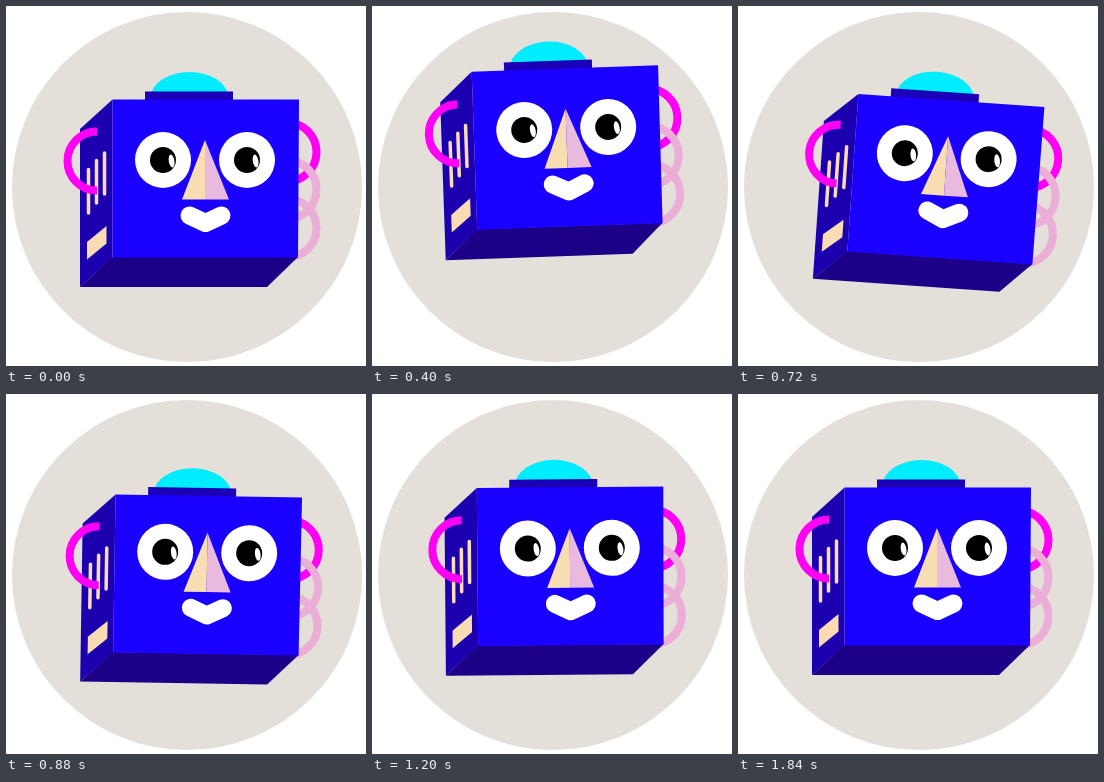
Write an HTML page that moves like this. It is 360 px wide and 360 px high and loops after 1.92 s.

```html
<!DOCTYPE html>
<html lang="en">
<head>
<meta charset="utf-8">
<title>Bouncing robot</title>
<style>
  html, body { margin: 0; width: 100%; height: 100%; overflow: hidden; background: #fff; }
  svg { display: block; width: 100vw; height: 100vh; }
</style>
</head>
<body>
<svg viewBox="0 0 360 360">
  <defs>
    <g id="eye">
      <circle r="28" fill="#fff"/>
      <circle r="13"/>
      <ellipse cx="8.6" cy="1" rx="2.8" ry="6.5" fill="#fff" transform="rotate(-9 8.6 1)"/>
    </g>
  </defs>
  <circle cx="181" cy="181" r="175" fill="#e4dfd9"/>
  <g id="robot">
    <g fill="none" stroke="#ebaed6" stroke-width="8">
      <circle cx="281" cy="146" r="29.5" stroke="#ff00f5"/>
      <circle cx="281" cy="183.500" r="29.5"/>
      <circle cx="281" cy="222" r="29.5"/>
    </g>
    <ellipse cx="183.500" cy="92" rx="39" ry="26" fill="#00ecff"/>
    <path d="M139 85.500H227V95H139z" fill="#1c00b8"/>
    <path d="M74 123L106.500 93.500V251.500L74 281z" fill="#1c00b0"/>
    <path d="M106.500 251L292 251L261 281H74z" fill="#1c0088"/>
    <path d="M106.500 93.500H293L292 251.500H106.500z" fill="#1a00ff"/>
    <g stroke="#fadcb4" stroke-width="3.5" stroke-linecap="round">
      <path d="M82.500 163.500V207M90.500 154.500V197M98.500 147V188"/>
    </g>
    <path d="M81 236L100.500 220V237.500L81 253.500z" fill="#fadcb4"/>
    <path d="M91 125.500a29.500 29.500 0 0 0 0 59" fill="none" stroke="#ff00f5" stroke-width="8"/>
    <g id="face">
      <g id="eyes">
        <use href="#eye" x="157"/>
        <use href="#eye" x="241"/>
      </g>
      <path d="M199 134V193.500H176z" fill="#f8dcb2"/>
      <path d="M199 134L223 193.500H199z" fill="#e9b9de"/>
      <path d="M183.500 209.500L199.500 217L215.500 209.500" fill="none" stroke="#fff"
            stroke-width="18" stroke-linecap="round" stroke-linejoin="round"/>
    </g>
  </g>
</svg>
<script>
const LOOP = 1920, STEP = 80;

// Keys are [time in ms, value].
const lift = [[0, 0], [400, -30], [880, 8], [1200, 0], [1360, -1.8], [1520, -0.8], [1840, 0], [LOOP, 0]];
const tilt = [[0, 0], [160, 3.2], [240, 0.9], [400, -2], [560, -0.4], [720, 4], [880, 0.9],
  [1040, -0.5], [1200, -0.5], [1520, 0], [LOOP, 0]];
const lag = [[0, 0], [240, 1.8], [400, -0.5], [560, -3], [720, -4.5], [880, -4], [1200, 0.5], [1520, 0], [LOOP, 0]];

// Slope at a key: flat at turning points, averaged elsewhere.
function slope(keys, i) {
  if (i === 0 || i === keys.length - 1) return 0;
  const [[ta, a], [t, v], [tb, b]] = keys.slice(i - 1, i + 2);
  return (v - a) * (b - v) <= 0 ? 0 : (b - a) / (tb - ta);
}

function sample(keys, t) {
  const i = keys.findIndex(k => k[0] > t) - 1;
  const [ta, a] = keys[i], [tb, b] = keys[i + 1];
  const d = tb - ta, p = (t - ta) / d, q = 1 - p;
  return a * q * q * (1 + 2 * p) + b * p * p * (1 + 2 * q)
    + d * p * q * (q * slope(keys, i) - p * slope(keys, i + 1));
}

const part = id => document.getElementById(id);
const robot = part("robot"), face = part("face"), eyes = part("eyes");

function draw(t) {
  const open = Math.min(1, Math.abs(t - 560) / 160);
  robot.setAttribute("transform", `translate(0 ${sample(lift, t)}) rotate(${sample(tilt, t)} 167 290)`);
  face.setAttribute("transform", `translate(0 ${sample(lag, t)})`);
  eyes.setAttribute("transform", `translate(0 154) scale(1 ${open})`);
  eyes.style.visibility = open ? "visible" : "hidden";
}

const start = performance.now();
function tick() {
  const t = (performance.now() - start) % LOOP;
  draw(Math.floor(t / STEP) * STEP);
  requestAnimationFrame(tick);
}
tick();
</script>
</body>
</html>
```
